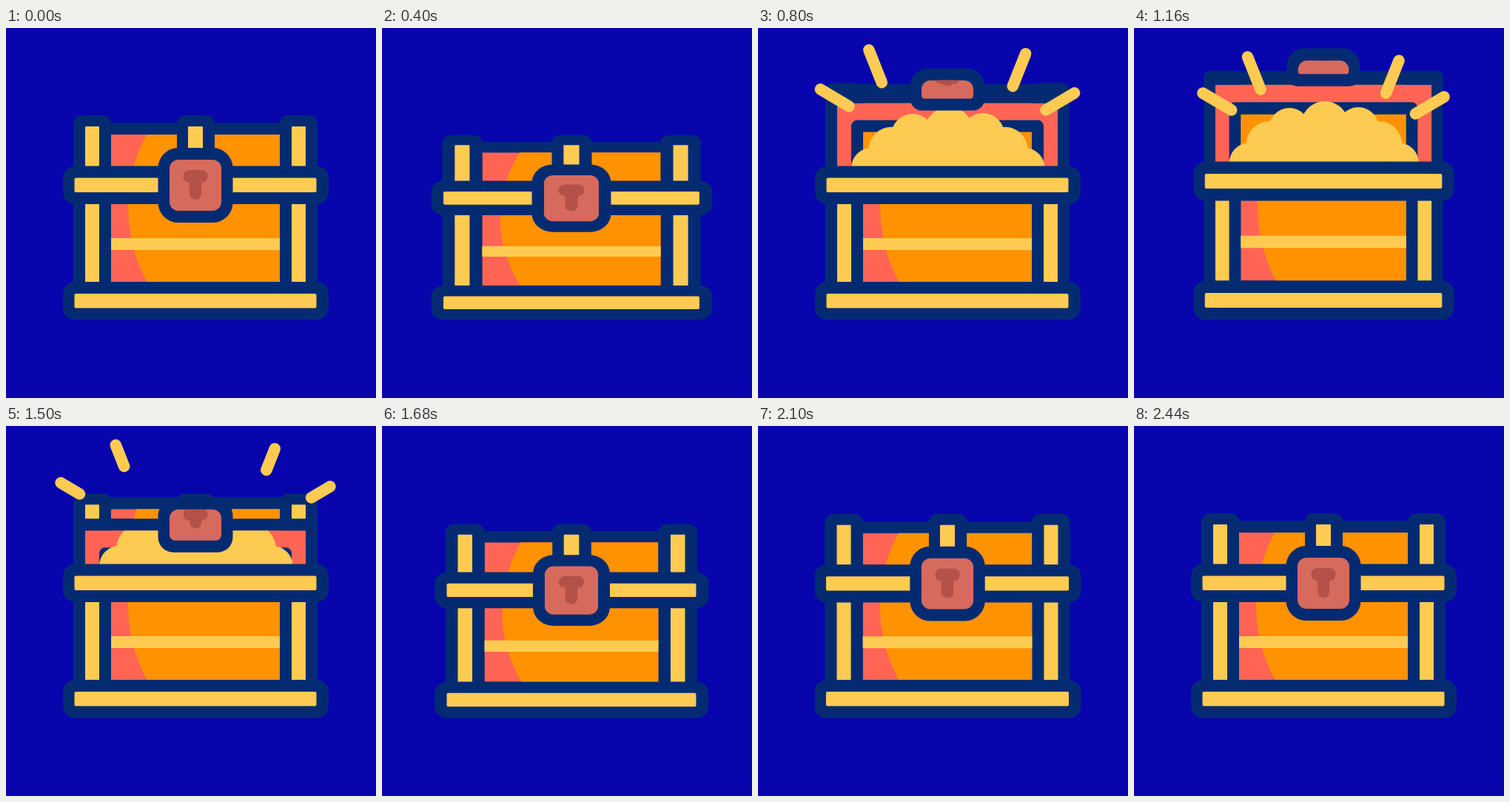
These frames come from a looping animation (500x500 px, 2600 ms). An HTML page with a canvas:

```html
<!DOCTYPE html>
<html>
<head>
<meta charset="utf-8">
<style>
  html, body { margin: 0; width: 100%; height: 100%; overflow: hidden; background: #0705ab; }
  canvas { display: block; }
</style>
</head>
<body>
<canvas id="stage" width="500" height="500"></canvas>
<script>
const ctx = document.getElementById('stage').getContext('2d');
const LOOP = 2600;
const BG = '#0705ab', NAVY = '#042b72', YELLOW = '#fecb52', ORANGE = '#ff9200',
      PINK = '#ff6455', LOCK = '#d66a5c', KEYHOLE = '#b45148';

// Each track is a list of [time, value] keys with smooth easing between them.
const scaleX = [[0, 1], [380, 1.062], [540, .98], [670, 1.03], [800, 1], [1140, .98],
                [1500, 1], [1620, 1], [1720, 1.046], [1880, .979], [2060, 1.004], [2220, 1]];
const scaleY = [[0, 1], [380, .897], [540, 1.029], [670, .965], [800, 1], [1140, 1.029],
                [1500, 1], [1620, 1], [1720, .92], [1880, 1.022], [2060, .996], [2220, 1]];
const lidOpen = [[540, 0], [880, .967], [1390, .967], [1620, 0]];
const rayShift = [[580, -40], [700, 17], [930, 0], [1340, 0], [1600, 32.5]];
const rayLength = [[580, 0], [700, 45], [1430, 45], [1610, 0]];

// Bumps of the treasure heap: x, y, radius.
const heap = [[153, 189, 27], [180.5, 164.7, 31], [209, 145, 29], [258, 140.5, 33.5],
              [304, 144, 29], [333.5, 164.7, 31], [360.5, 189, 27]];

function at(track, t) {
  const i = track.findIndex(key => key[0] > t);
  if (i === 0) return track[0][1];
  if (i < 0) return track[track.length - 1][1];
  const [t0, a] = track[i - 1], [t1, b] = track[i];
  const u = (t - t0) / (t1 - t0);
  return a + (b - a) * u * u * (3 - 2 * u);
}

function box(color, x1, y1, x2, y2, radius = 0) {
  if (y2 <= y1) return;
  ctx.fillStyle = color;
  ctx.beginPath();
  ctx.roundRect(x1, y1, x2 - x1, y2 - y1, radius);
  ctx.fill();
}

function disc(color, x, y, r) {
  ctx.fillStyle = color;
  ctx.beginPath();
  ctx.arc(x, y, r, 0, 2 * Math.PI);
  ctx.fill();
}

// Orange panel with a curved pink shade on its left.
function panel(y1, y2, curveY) {
  if (y2 <= y1) return;
  ctx.save();
  ctx.beginPath();
  ctx.rect(142, y1, 228, y2 - y1);
  ctx.clip();
  box(PINK, 142, y1, 370, y2);
  disc(ORANGE, 374, curveY, 209);
  ctx.restore();
}

function rail(y) {
  box(NAVY, 77, y, 436, y + 51.5, 16);
  box(YELLOW, 92.5, y + 16, 419.5, y + 35.5, 2);
}

function drawLidInside(hinge) {
  box(NAVY, 91, hinge - 8, 421, 215, 8);
  box(PINK, 107, hinge, 405, 215);
  box(NAVY, 126, hinge + 31, 386, 215, 8);
  box(ORANGE, 142, hinge + 47, 370, 215);
}

function drawHeap() {
  heap.forEach(([x, y, r]) => disc(YELLOW, x, y, r));
  box(YELLOW, 170, 160, 345, 215);
  box(YELLOW, 209, 140, 304, 170);
}

function drawLidFront(hinge, open) {
  const top = hinge - 59 * (1 - open), tab = top - 18 + 10 * open;
  box(NAVY, 91, top - 8, 421, hinge + 8, [8, 8, 0, 0]);
  panel(top + 8, hinge - 8, hinge + 48);
  for (const [x1, x2] of [[91, 142], [370, 421], [231, 282]])
    box(NAVY, x1, tab, x2, hinge + 8, [11, 11, 0, 0]);
  for (const [x1, x2] of [[107, 126], [386, 405], [246, 266]])
    box(YELLOW, x1, tab + 15, x2, hinge - 8, 1);
}

function drawBody() {
  box(NAVY, 91, 215, 421, 355);
  box(YELLOW, 107, 230, 126, 343);
  box(YELLOW, 386, 230, 405, 343);
  panel(230, 343, 243);
  box(YELLOW, 142, 284, 370, 300);
  rail(186.5);
  rail(343);
}

function drawLock(open) {
  const top = 178 - 128.4 * open, bottom = 247 - 181.5 * open;
  const low = 12 - 9 * open;
  box(NAVY, 205.5, top - 16, 306.5, bottom + 16, [27, 27, low + 15, low + 15].map(r => r - 4 * open));
  box(LOCK, 221, top, 291, bottom, [12, 12, low, low]);
  ctx.save();
  ctx.clip();
  box(KEYHOLE, 239.5, 192 - 158 * open, 272.5, 209 - 160 * open, 8);
  box(KEYHOLE, 248, 195 - 158 * open, 264, 232 - 184 * open, 8);
  ctx.restore();
}

function drawRay(x, y, dx, dy, shift, length) {
  const ox = x - dx * shift, oy = y - dy * shift;
  ctx.beginPath();
  ctx.moveTo(ox, oy);
  ctx.lineTo(ox + dx * length, oy + dy * length);
  ctx.stroke();
}

function drawRays(t) {
  const shift = at(rayShift, t), length = at(rayLength, t);
  if (length < .5) return;
  const upper = Math.min(shift, 7 + shift / 3);
  ctx.strokeStyle = YELLOW;
  ctx.lineWidth = 15.5;
  ctx.lineCap = 'round';
  drawRay(93, 88, .86, .51, shift, length);
  drawRay(419, 93, -.86, .51, shift, length);
  drawRay(153.5, 39, .37, .93, upper, length * 1.05);
  drawRay(358, 44, -.37, .93, upper, length * 1.05);
}

function draw(t) {
  const open = at(lidOpen, t), hinge = 195 - 121.5 * open;
  ctx.fillStyle = BG;
  ctx.fillRect(0, 0, 500, 500);
  ctx.save();
  ctx.translate(256.5, 394);
  ctx.scale(at(scaleX, t), at(scaleY, t));
  ctx.translate(-256.5, -394);
  if (open > 0) {
    drawLidInside(hinge);
    drawHeap();
  }
  drawLidFront(hinge, open);
  drawBody();
  drawLock(open);
  ctx.restore();
  drawRays(t);
}

function frame() {
  draw(performance.now() % LOOP);
  requestAnimationFrame(frame);
}
frame();
</script>
</body>
</html>
```
